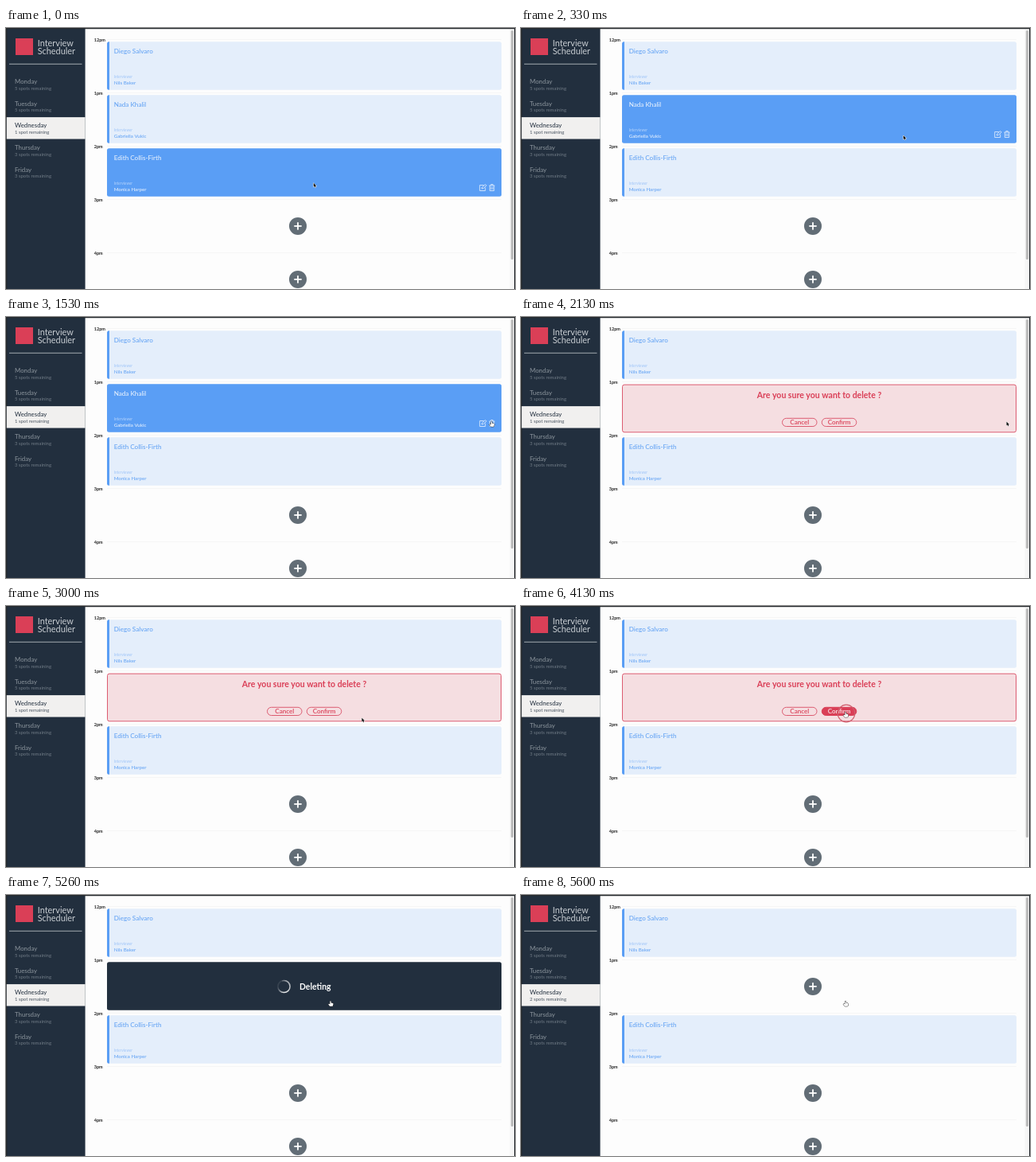
Recreate the animation shown at these times as an HTML page with a canvas. Size 640 px wide and 328 px high, loop 5.66 s.

```html
<!DOCTYPE html>
<html lang="en">
<head>
<meta charset="utf-8">
<title>Interview Scheduler</title>
<style>
html, body { margin: 0; width: 100%; height: 100%; overflow: hidden; background: #fdfdfd; }
canvas { display: block; width: 640px; height: 328px; }
</style>
</head>
<body>
<canvas id="stage"></canvas>
<script>
const LOOP = 5660, W = 640, H = 328;
const PANEL_AT = 2130, DELETE_AT = 4260, EMPTY_AT = 5460;
const NAVY = '#222f3e', BLUE = '#5a9ef5', RED = '#da3f57', EDGE = '#24282c';
const LEFT = 127, WIDTH = 496, ROW = 67, TALL = 60.5;
const rowTop = i => 17.3 + ROW * i;

const days = [['Monday', 5], ['Tuesday', 5], ['Wednesday', 1], ['Thursday', 3], ['Friday', 3]];
const bookings = [
  ['Diego Salvaro', 'Nils Baker'],
  ['Nada Khalil', 'Gabriella Vukic'],
  ['Edith Collis-Firth', 'Monica Harper']
];
// pointer tip: time, x, y
const path = [
  [0, 386.5, 195], [330, 480.5, 135], [600, 560, 133], [900, 596, 132.5],
  [1200, 600, 132], [1530, 610.5, 131.5], [2400, 610.5, 131.5], [2700, 530, 138],
  [3000, 447.5, 140.5], [3300, 421, 136], [3600, 408, 133.5], [LOOP, 408, 133.5]
];
const clicks = [[2000, 2130], [4060, 4260]];

const canvas = document.getElementById('stage');
const ctx = canvas.getContext('2d');
const scale = window.devicePixelRatio || 1;
canvas.width = W * scale;
canvas.height = H * scale;

function text(str, x, y, size, color, style = '', align = 'left') {
  ctx.font = `${style} ${size}px Lato, "Open Sans", sans-serif`;
  ctx.textAlign = align;
  ctx.fillStyle = color;
  ctx.fillText(str, x, y);
}

function rect(x, y, w, h, color) {
  ctx.fillStyle = color;
  ctx.fillRect(x, y, w, h);
}

function box(x, y, w, h, r, fill, stroke) {
  ctx.beginPath();
  ctx.roundRect(x, y, w, h, r);
  if (fill) { ctx.fillStyle = fill; ctx.fill(); }
  if (stroke) { ctx.strokeStyle = stroke; ctx.lineWidth = 1; ctx.stroke(); }
}

function ring(x, y, r, color, width) {
  ctx.beginPath();
  ctx.arc(x, y, r, 0, Math.PI * 2);
  ctx.strokeStyle = color;
  ctx.lineWidth = width;
  ctx.stroke();
}

// Draws an SVG path at a place
function shape(d, x, y, fill, stroke, width = 0.8) {
  const p = new Path2D(d);
  ctx.save();
  ctx.translate(x, y);
  ctx.lineWidth = width;
  ctx.lineJoin = 'round';
  if (stroke) { ctx.strokeStyle = stroke; ctx.stroke(p); }
  if (fill) { ctx.fillStyle = fill; ctx.fill(p); }
  ctx.restore();
}

function pointerAt(t) {
  const i = path.findIndex(p => p[0] > t);
  const [t0, x0, y0] = path[i - 1], [t1, x1, y1] = path[i];
  const k = (t - t0) / (t1 - t0);
  return [x0 + (x1 - x0) * k, y0 + (y1 - y0) * k];
}

const inside = ([px, py], x, y, w, h) => px >= x && px <= x + w && py >= y && py <= y + h;

function sidebar(open) {
  rect(0, 0, 99.6, H, NAVY);
  rect(0, 0, 1.4, H, EDGE);
  rect(12, 13, 22, 21, RED);
  text('Interview', 39.7, 22.6, 10.9, '#c9ced3');
  text('Scheduler', 39.7, 32.6, 10.9, '#c9ced3');
  rect(4, 44.8, 91.5, 0.9, '#b0b7bd');
  days.forEach(([day, count], i) => {
    const y = 70 + 27.7 * i, on = i === 2, n = on ? open : count;
    if (on) rect(0.8, 112.1, 98.8, 27.4, '#f1f0ef');
    text(day, 11, y, 7.85, on ? NAVY : '#8c959d');
    text(`${n} spot${n > 1 ? 's' : ''} remaining`, 11, y + 7.5, 5.95, on ? '#4a5561' : '#707b86');
  });
}

function plus(i) {
  const y = rowTop(i) + 30.6;
  ctx.beginPath();
  ctx.arc(367, y, 11, 0, Math.PI * 2);
  ctx.fillStyle = '#626d76';
  ctx.fill();
  rect(362.3, y - 0.9, 9.4, 1.8, '#fff');
  rect(366.1, y - 4.7, 1.8, 9.4, '#fff');
}

function card(i, on) {
  const y = rowTop(i), [name, host] = bookings[i];
  const ink = on ? '#e6f0fd' : '#65a4f4';
  box(LEFT, y, WIDTH, TALL, 2.5, on ? BLUE : '#e4eefb');
  if (!on) box(LEFT, y, 3, TALL, [2.5, 0, 0, 2.5], BLUE);
  text(name, 135.7, y + 14.2, 8.1, ink, '500');
  text('Interviewer', 135.7, y + 46, 5, on ? '#b3d2fb' : '#a0c6f8', 'italic');
  text(host, 135.7, y + 53.3, 6.2, ink, '500');
  if (!on) return;
  const iy = y + 49.2, line = '#d9e8fd';
  shape('M1 -3H-4V4H3V0M-1.5 1.5L-1 -.5L3 -4L4.5 -2.5L.5 1Z', 599.7, iy, null, line, 0.9);
  shape('M-3.5 -2.5H3.5M-1.2 -2.5V-4H1.2V-2.5M-2.7 -2.5V4H2.7V-2.5M-1 -.8V2.5M1 -.8V2.5', 611, iy, null, line, 0.9);
}

function button(label, x, hot) {
  box(x, 127.3, 43.5, 10.2, 5.1, hot ? RED : null, hot ? RED : '#dc5c71');
  text(label, x + 21.8, 135.1, 8.1, hot ? '#f8e4e7' : RED, '600', 'center');
}

function confirmPanel(hot) {
  box(LEFT + 0.5, rowTop(1) + 0.8, WIDTH - 1, TALL - 0.8, 2.5, '#f5dee1', '#dc5c71');
  text('Are you sure you want to delete ?', 375, 101.8, 10.5, RED, 'bold', 'center');
  button('Cancel', 328.5, false);
  button('Confirm', 378.3, hot);
}

function deletingPanel(t) {
  box(LEFT, rowTop(1), WIDTH, TALL, 2.5, NAVY);
  const x = 349.5, y = 115;
  const fade = ctx.createConicGradient(Math.PI * 2 * (t - 4530) / 1000 - 0.2, x, y);
  fade.addColorStop(0, '#ffffff40');
  fade.addColorStop(0.1, '#ffffff90');
  fade.addColorStop(0.55, '#ffffffe0');
  fade.addColorStop(0.75, '#ffffff30');
  fade.addColorStop(0.8, '#ffffff18');
  fade.addColorStop(1, '#ffffff18');
  ring(x, y, 7.6, fade, 1.5);
  text('Deleting', 369, 118.6, 10.4, '#fff', 'bold');
}

function pointer([x, y], hand) {
  if (hand) {
    shape('M-.6 0Q0 -.7 .6 0V2L3 2.6Q3.6 2.9 3.4 4L2.7 6.3H-.9L-2.6 4Q-2.6 3 -1.7 3.3L-.6 4Z', x, y, '#fff', '#222', 1);
  } else {
    shape('M0 0V5L1.2 4L2 5.8L2.8 5.4L2.1 3.7H3.6Z', x, y, '#111', '#fff', 1);
  }
}

function frame(t) {
  const p = pointerAt(t);
  const overIcon = t < PANEL_AT && inside(p, 595, 128, 21, 10);
  const overConfirm = inside(p, 378, 127, 44, 10.5);
  const empty = t >= EMPTY_AT;

  ctx.setTransform(scale, 0, 0, scale, 0, 0);
  rect(0, 0, W, H, '#fdfdfd');
  for (let i = 0; i < 5; i++) {
    const y = 14.7 + ROW * i;
    text(i ? i + 'pm' : '12pm', 110.8, y + 1.9, 5.5, '#222', 'bold');
    rect(LEFT, y - 0.7, WIDTH, 1, '#f6f6f6');
  }
  sidebar(empty ? 2 : 1);

  for (const i of [0, 1, 2]) {
    if (i !== 1 || t < PANEL_AT) card(i, inside(p, LEFT, rowTop(i), WIDTH, TALL) && t < PANEL_AT);
    else if (t < DELETE_AT) confirmPanel(overConfirm);
    else if (!empty) deletingPanel(t);
    else plus(1);
  }
  plus(3);
  plus(4);

  // window edges and scrollbar
  rect(633.5, 1, 5.5, H, '#f6f6f6');
  box(634.8, 3, 3.2, 288, 1.6, '#bdbdbd');
  rect(0, 0, W, 1.2, EDGE);
  rect(639, 0, 1, H, EDGE);

  if (clicks.some(([a, b]) => t >= a && t < b)) ring(p[0] + 1, p[1] + 1.5, 10.8, '#cf5d6c', 1.2);
  pointer(p, overIcon || overConfirm);
}

function tick(now) {
  frame(now % LOOP);
  requestAnimationFrame(tick);
}
frame(0);
requestAnimationFrame(tick);
</script>
</body>
</html>
```
